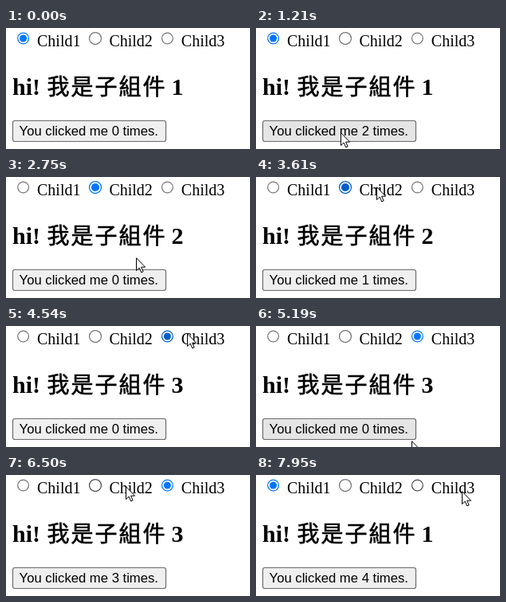
An HTML page that plays this animation: 306x152 px, repeating every 8 s.

```html
<!DOCTYPE html>
<html lang="zh-Hant">
<head>
<meta charset="utf-8">
<title>Child counters</title>
<style>
html, body { margin: 0; width: 100%; height: 100%; overflow: hidden; background: #fff; }
svg { display: block; width: 306px; height: 152px; }
.label { font: 20px "Liberation Serif", "Times New Roman", serif; }
.title { font: bold 30px "Liberation Serif", "Times New Roman", serif; }
.han { font: 28px "Noto Sans CJK TC", "Noto Sans CJK JP", "Noto Sans CJK", sans-serif; letter-spacing: 2px; stroke: #000; stroke-width: .6px; }
.count { font: 16.67px "Liberation Sans", Arial, sans-serif; }
</style>
</head>
<body>
<svg viewBox="0 0 306 152">
  <g id="options"></g>
  <text class="title" x="8" y="84">hi! <tspan class="han" x="51.5">我是子組件</tspan><tspan id="number" x="207.5"></tspan></text>
  <rect id="button" x="8.5" y="116.5" width="192" height="26" rx="2.5" stroke="#6b6b6b" stroke-width="1.2"/>
  <text class="count" id="count" x="16.6" y="135"></text>
  <path id="cursor" d="M.5 .7V16.6L4.2 13.1L6.7 18.9L9.1 17.9L6.6 12.2H11.6Z" fill="#fff" stroke="#000"/>
</svg>
<script>
const LOOP = 8000;
const TICK = 60;
const HOLD = 110;
const PITCH = 90.4;

const byId = id => document.getElementById(id);
const [number, button, count, cursor] = ["number", "button", "count", "cursor"].map(byId);

// The middle radio lands on the pixel grid one pixel wider
byId("options").innerHTML = [6.9, 7.5, 6.9].map((r, i) => {
  const x = 21.6 + i * PITCH;
  return `<circle class="ring" cx="${x}" cy="13" r="${r}" fill="#fff" stroke-width="1.25"/>
    <circle class="dot" cx="${x}" cy="13" r="${r - 2.4}"/>
    <text class="label" x="${39 + i * PITCH}" y="22.6">Child${i + 1}</text>`;
}).join("");
const rings = document.querySelectorAll(".ring");
const dots = document.querySelectorAll(".dot");

// The pointer's tour: arrive at a point, stay, click at an even pace
const stops = [];
const clicks = [];
function visit(at, x, y, stay = 0, times = 0) {
  stops.push({ at, x, y, leave: at + stay });
  for (let i = 1; i <= times; i++) clicks.push({ at: at + stay * i / times, x, y });
}
visit(260, 213, 55);
visit(720, 106, 131, 930, 4);
visit(2210, 128, 32);
visit(2350, 113, 14, 80, 1);
visit(2700, 163, 101, 60);
visit(3030, 160, 126, 210, 1);
visit(3600, 151, 12);
visit(3660, 220, 9, 420);
visit(4310, 203, 13, 80, 1);
visit(4710, 273, 1);
visit(4940, 264, 26);
visit(5160, 195, 144, 60);
visit(5280, 175, 132, 550, 3);
visit(6300, 150, 14, 270, 1);
visit(6920, 23, 11, 140, 1);
visit(7400, 120, 0);
visit(7900, 258, 20);

const overButton = (x, y) => x >= 8 && x <= 201 && y >= 116 && y < 145;

function optionAt(x, y) {
  const i = Math.floor((x - 14) / PITCH);
  return y >= 2 && y <= 24 && x - 14 - i * PITCH <= 80 ? i : -1;
}

function pointer(t) {
  const i = stops.findLastIndex(s => s.at <= t);
  if (i < 0) return [-50, -50];
  const a = stops[i];
  const b = stops[i + 1] || a;
  const k = t <= a.leave || a === b ? 0 : (t - a.leave) / (b.at - a.leave);
  return [Math.round(a.x + (b.x - a.x) * k), Math.round(a.y + (b.y - a.y) * k)];
}

function stateAt(t) {
  const counts = [0, 0, 0];
  let child = 0;
  for (const c of clicks.filter(c => c.at <= t)) {
    if (overButton(c.x, c.y)) counts[child]++;
    else child = optionAt(c.x, c.y);
  }
  return { child, total: counts[child] };
}

function draw(time) {
  const t = Math.floor(time / TICK) * TICK;
  const [x, y] = pointer(t);
  const { child, total } = stateAt(t);
  const held = clicks.some(c => c.at > t && c.at - t <= HOLD);
  const hovered = optionAt(x, y);

  rings.forEach((ring, i) => {
    const [idle, hover] = i === child ? ["#0075ff", "#005cc8"] : ["#767676", "#4f4f4f"];
    const color = i === hovered ? hover : idle;
    ring.setAttribute("stroke", color);
    dots[i].setAttribute("fill", i === child ? color : "none");
  });
  number.textContent = child + 1;
  count.textContent = `You clicked me ${total} times.`;
  button.setAttribute("fill", !overButton(x, y) ? "#efefef" : held ? "#f5f5f5" : "#e5e5e5");
  cursor.setAttribute("transform", `translate(${x} ${y})`);
}

const begin = performance.now();
function tick() {
  draw((performance.now() - begin) % LOOP);
  requestAnimationFrame(tick);
}
tick();
</script>
</body>
</html>
```
